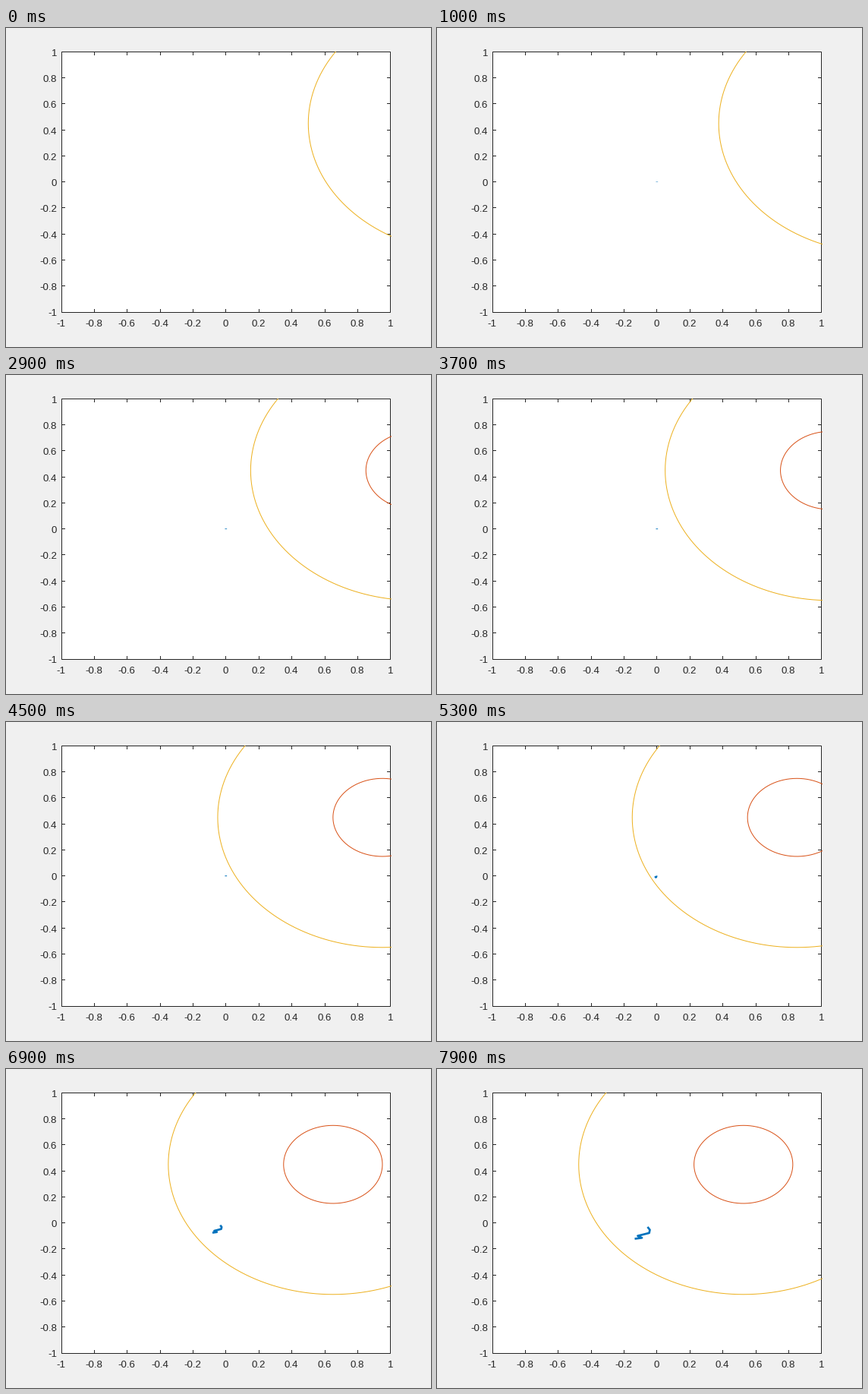
Animation, 560 px wide and 420 px high, one loop 8000 ms. Source, as a matplotlib script:

```python
import numpy as np
import matplotlib.pyplot as plt
from matplotlib.animation import FuncAnimation
from matplotlib.patches import Rectangle

W, H = 560, 420
# Exact plot area in pixels, y downwards, and the pixel centres of its border.
LEFT, TOP, WIDTH, HEIGHT = 0.13 * W, 0.075 * H, 0.775 * W, 0.815 * H
X0, X1, Y0, Y1 = 73.5, 506.5, 31.5, 374.5
INK = "#262626"
BLUE, RED, YELLOW = "#0072BD", "#D95319", "#EDB120"
FRAMES, INTERVAL = 80, 100
FLEE_START = 49.5  # tick at which the outer circle reaches the origin

plt.rcParams["font.family"] = "Liberation Sans"

# At 72 dpi one point equals one pixel.
fig = plt.figure(figsize=(W / 72, H / 72), dpi=72, facecolor="#F0F0F0")
ax = fig.add_axes([0, 0, 1, 1])
ax.set_xlim(0, W)
ax.set_ylim(H, 0)
ax.axis("off")


def to_px(x, y):
    return LEFT + (x + 1) * WIDTH / 2, TOP + (1 - y) * HEIGHT / 2


def pixel_centre(v):
    return np.floor(v) + 0.5


def tick_mark(x, y, dx, dy):
    ax.plot([x, x + dx], [y, y + dy], color=INK, lw=1, snap=False,
            solid_capstyle="projecting", zorder=2)


def draw_axes():
    ax.add_patch(Rectangle((X0, Y0), X1 - X0, Y1 - Y0, fc="white", ec=INK,
                           lw=1, snap=False, zorder=1))
    for value in np.arange(-5, 6) / 5:
        x, y = to_px(value, value)
        style = dict(color=INK, fontsize=13.3, va="baseline")
        ax.text(x - 0.5, 393, f"{value:g}", ha="center", **style)
        ax.text(67, y + 5.5, f"{value:g}", ha="right", **style)
        if abs(value) < 1:
            x, y = pixel_centre(x), pixel_centre(y)
            tick_mark(x, Y1, 0, -4)
            tick_mark(x, Y0, 0, 4)
            tick_mark(X0, y, 4, 0)
            tick_mark(X1, y, -4, 0)


draw_axes()
clip = Rectangle((X0 - 0.5, Y0 - 1), X1 - X0 + 1.5, Y1 - Y0 + 1.5,
                 transform=ax.transData)


def curve(color, width):
    line, = ax.plot([], [], color=color, lw=width, zorder=3, snap=False,
                    solid_capstyle="butt", solid_joinstyle="round")
    line.set_clip_path(clip)
    return line


trail = curve(BLUE, 2.7)
inner = curve(RED, 1)
outer = curve(YELLOW, 1)

angle = np.linspace(0, 2 * np.pi, 361)
# Fully grown trail in plot units, tail to head.
TRAIL_X = np.array([-0.057, -0.043, -0.047, -0.117, -0.091, -0.135])
TRAIL_Y = np.array([-0.034, -0.055, -0.078, -0.099, -0.113, -0.119])
SPREAD = np.linspace(0.003, -0.003, len(TRAIL_X))


def shown_tick(frame):
    """Tick on screen: steps of one with regular pauses, later steps of two."""
    if frame >= 29:
        return frame - (frame - 29) % 2
    paused = (3 * frame - 2) % 20 < 3
    return min(frame - paused, 26)


def set_circle(line, cx, radius):
    line.set_data(*to_px(cx + radius * np.cos(angle),
                         0.45 + radius * np.sin(angle)))


def set_trail(tick):
    """A dot that slowly appears, then stretches away from the circles."""
    flee = max(0, (tick - FLEE_START) / (FRAMES - 1 - FLEE_START)) ** 1.2
    dot = min(1, tick / 45) ** 0.5
    trail.set_data(*to_px(flee * TRAIL_X, flee * TRAIL_Y + dot * SPREAD))


def update(frame):
    tick = shown_tick(frame)
    cx = 1.5 - 0.0125 * (tick - (tick > 26))
    set_circle(inner, cx, 0.3)
    set_circle(outer, cx, 1)
    set_trail(tick)
    return trail, inner, outer


anim = FuncAnimation(fig, update, frames=FRAMES, interval=INTERVAL,
                     repeat=True, repeat_delay=0)
plt.show()
```
